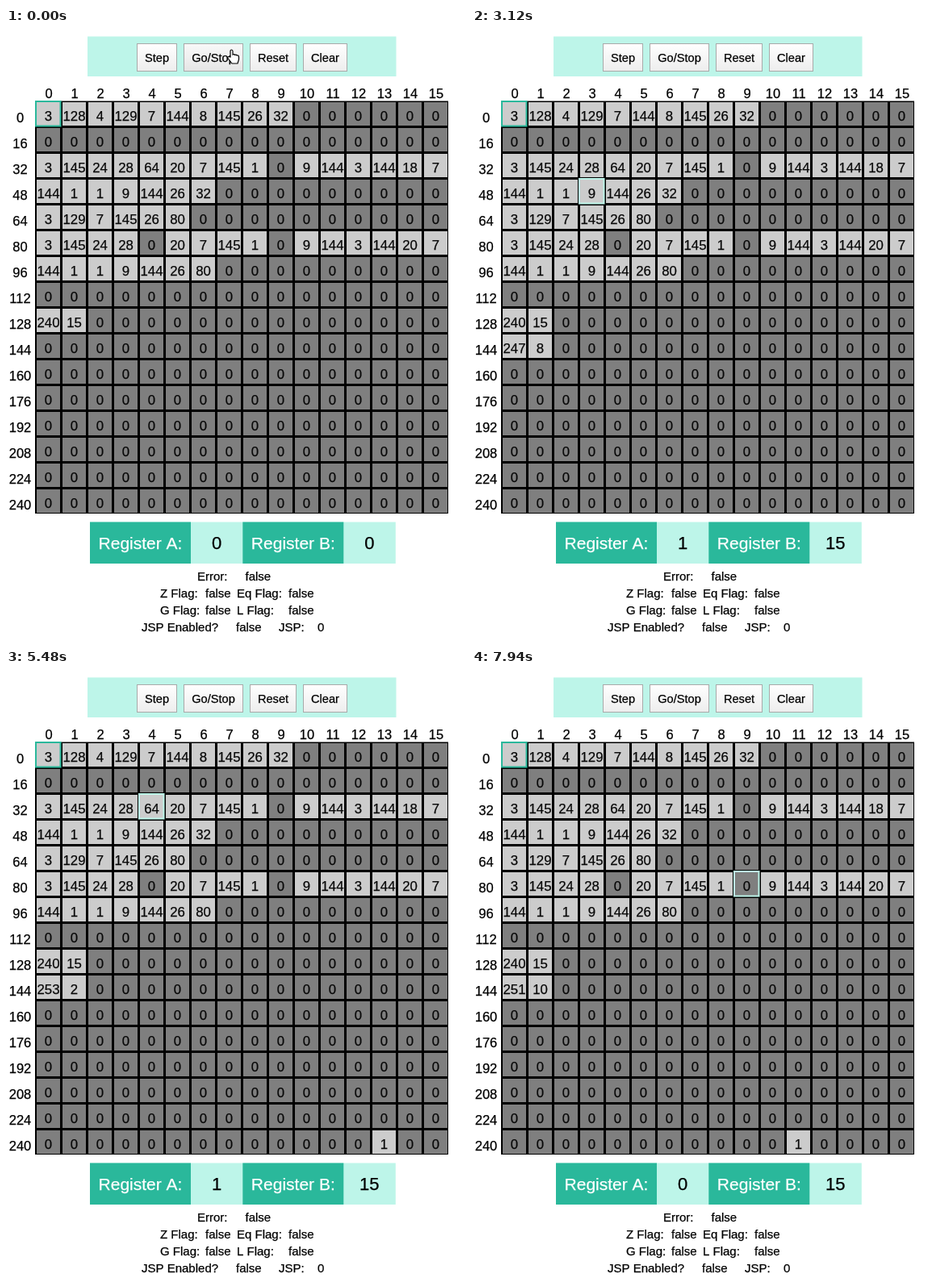
Animation, 570 px wide and 760 px high, one loop 7.99 s. Source, as an HTML page with a canvas:

```html
<!DOCTYPE html>
<html lang="en">
<head>
<meta charset="utf-8">
<title>Memory machine</title>
<style>
html, body { margin: 0; width: 100%; height: 100%; overflow: hidden; background: #fff; }
canvas { display: block; }
</style>
</head>
<body>
<canvas id="stage" width="570" height="760"></canvas>
<script>
const ctx = document.getElementById('stage').getContext('2d');
const LOOP = 7990, MINT = '#bdf5e9', TEAL = '#2ab89b';
const LEFT = 36, TOP = 90, PITCH = 32;

const CODE = { SET: 1, LDA: 3, LDB: 4, STA: 7, STB: 8, PUT: 9, INC: 18, DEC: 20, TEST: 24, JMP: 26, JZ: 28 };
const NAME = Object.fromEntries(Object.entries(CODE).map(([name, n]) => [n, name]));
const VARS = { PTR: 144, COUNT: 145 };

// Moves a 1 through the last memory row until COUNT runs out
const sweep = (move, start, exit) => `
  LDA COUNT TEST JZ ${exit} DEC STA COUNT
  SET 0 PUT PTR LDA PTR ${move} STA PTR
  SET 1 PUT PTR JMP ${start}`;

function loadProgram() {
  const mem = new Array(256).fill(0);
  const put = (start, source) => source.trim().split(/\s+/)
    .forEach((word, i) => mem[start + i] = CODE[word] ?? VARS[word] ?? +word);
  put(0, 'LDA 128 LDB 129 STA PTR STB COUNT JMP 32');
  put(32, sweep('INC', 32, 64));
  put(64, 'LDA 129 STA COUNT JMP 80');
  put(80, sweep('DEC', 80, 0));
  put(128, '240 15');
  return mem;
}

function runMachine(ticks) {
  const mem = loadProgram(), log = [];
  let a = 0, b = 0, zero = false, pc = 0, op = null;
  const single = {
    INC: () => a++,
    DEC: () => a--,
    TEST: () => zero = a === 0
  };
  const withArg = {
    SET: n => a = n,
    LDA: n => a = mem[n],
    LDB: n => b = mem[n],
    STA: n => mem[n] = a,
    STB: n => mem[n] = b,
    PUT: n => mem[mem[n]] = a,
    JMP: n => pc = n,
    // a jump not taken runs the next instruction in the same tick
    JZ: n => zero ? pc = n : single[NAME[mem[pc++]]]()
  };
  const save = at => log.push({ mem: [...mem], a, b, zero, at });
  save(-1);
  for (let i = 0; i < ticks; i++) {
    const at = pc, value = mem[pc++];
    if (op) {
      withArg[op](value);
      op = null;
    } else if (single[NAME[value]]) single[NAME[value]]();
    else op = NAME[value];
    save(at);
  }
  return log;
}
const states = runMachine(450);

// The screen refreshes about every 70 ms, evenly between these moments
const KEYS = [300, 1090, 2210, 4000, 5480, 7190, 7940];

function heldTime(t) {
  const i = KEYS.findLastIndex(k => k <= t);
  if (i < 0) return 0;
  const from = KEYS[i], span = (KEYS[i + 1] ?? LOOP) - from;
  const step = span / Math.round(span / 70);
  return from + Math.floor((t - from) / step) * step;
}

// Nearly steady clock that lags a little halfway through
function stateIndex(t) {
  const u = (t - 1090) / 6850;
  return Math.max(0, Math.round(43 + 405 * u - 2 * Math.sin(Math.PI * u)));
}

function box(x, y, w, h, fill) {
  ctx.fillStyle = fill;
  ctx.fillRect(x, y, w, h);
}

function text(s, x, y, size, align = 'center', fill = '#000') {
  ctx.font = `${size}px "Liberation Sans", Arial, sans-serif`;
  ctx.textAlign = align;
  ctx.fillStyle = ctx.strokeStyle = fill;
  ctx.lineWidth = 0.25;
  ctx.fillText(s, x, y);
  ctx.strokeText(s, x, y);
}

function button(label, x, w, tones) {
  const g = ctx.createLinearGradient(0, 19, 0, 54);
  tones.forEach((c, i) => g.addColorStop(i / 2, c));
  box(x, 19, w, 35, g);
  ctx.strokeStyle = '#a9a9a9';
  ctx.lineWidth = 1;
  ctx.strokeRect(x + 0.5, 19.5, w - 1, 34);
  text(label, x + w / 2, 42, 14.6);
}

const cellX = i => LEFT + PITCH * (i % 16);
const cellY = i => TOP + PITCH * (i >> 4);

function ring(cell, color) {
  ctx.strokeStyle = color;
  ctx.lineWidth = 2;
  ctx.strokeRect(cellX(cell) + 1, cellY(cell) + 1, 30.5, 30.5);
}

function hand(x, y) {
  const p = new Path2D('M4 9V2Q4 0 5.5 0T7 2V6Q9 5 9.5 6.5Q11.5 5.5 12 7Q14.5 6.5 14.5 9V12L13 17H6L1 10.5Q0 8.5 2 8.5Z');
  ctx.save();
  ctx.translate(x, y);
  ctx.fillStyle = '#fff';
  ctx.fill(p);
  ctx.strokeStyle = '#000';
  ctx.lineWidth = 1.2;
  ctx.stroke(p);
  ctx.restore();
}

function drawToolbar(t) {
  box(101, 10.5, 382.5, 49.5, MINT);
  const pointing = t < 500;
  let x = 162;
  for (const label of ['Step', 'Go/Stop', 'Reset', 'Clear']) {
    ctx.font = '14.6px "Liberation Sans", Arial, sans-serif';
    const w = Math.round(ctx.measureText(label).width + 20);
    const hover = pointing && label === 'Go/Stop';
    button(label, x, w, hover ? ['#f8f8f8', '#f0f0f0', '#e4e4e4'] : ['#fff', '#f6f6f6', '#ededed']);
    x += w + 8;
  }
  if (pointing) hand(274, 27);
}

function drawMemory(now, before) {
  box(LEFT, TOP + 0.5, 512, 511.5, '#000');
  for (let i = 0; i < 16; i++) {
    text(i, LEFT + 17 + PITCH * i, 86.5, 16.5);
    text(16 * i, 17.5, 116.5 + PITCH * i, 16.5);
  }
  now.mem.forEach((v, i) => {
    // shading follows one tick behind when a cell is cleared
    const lit = v || before.mem[i];
    box(cellX(i) + 2, cellY(i) + 2, 29, 29, lit ? '#ccc' : '#7f7f7f');
    text(v, cellX(i) + 16.5, cellY(i) + 24.5, 16.8, 'center', '#080808');
  });
  ring(0, TEAL);
  if (now.at >= 0) ring(now.at, MINT);
}

function drawRegister(name, value, x) {
  box(x, 612.5, 189.5, 51.5, MINT);
  box(x, 612.5, 125, 51.5, TEAL);
  text(`Register ${name}:`, x + 62.5, 646, 21, 'center', '#fff');
  text(value, x + 157, 646, 22);
}

function drawStatus({ a, b, zero }) {
  drawRegister('A', a, 104);
  drawRegister('B', b, 293.3);
  const pair = (row, label, x, value, valueX) => {
    const y = 685 + 21 * row;
    text(label, x, y, 15, 'left');
    text(value, valueX, y, 15, 'left');
  };
  pair(0, 'Error:', 237, false, 296.5);
  pair(1, 'Z Flag:', 191, zero, 247);
  pair(1, 'Eq Flag:', 286, false, 350);
  pair(2, 'G Flag:', 191, false, 247);
  pair(2, 'L Flag:', 286, false, 350);
  pair(3, 'JSP Enabled?', 168, false, 285);
  pair(3, 'JSP:', 338, 0, 386);
}

function frame(clock) {
  const t = heldTime(clock % LOOP);
  const n = stateIndex(t);
  box(0, 0, 570, 760, '#fff');
  drawToolbar(t);
  drawMemory(states[n], states[Math.max(0, n - 1)]);
  drawStatus(states[n]);
  requestAnimationFrame(frame);
}
requestAnimationFrame(frame);
</script>
</body>
</html>
```
